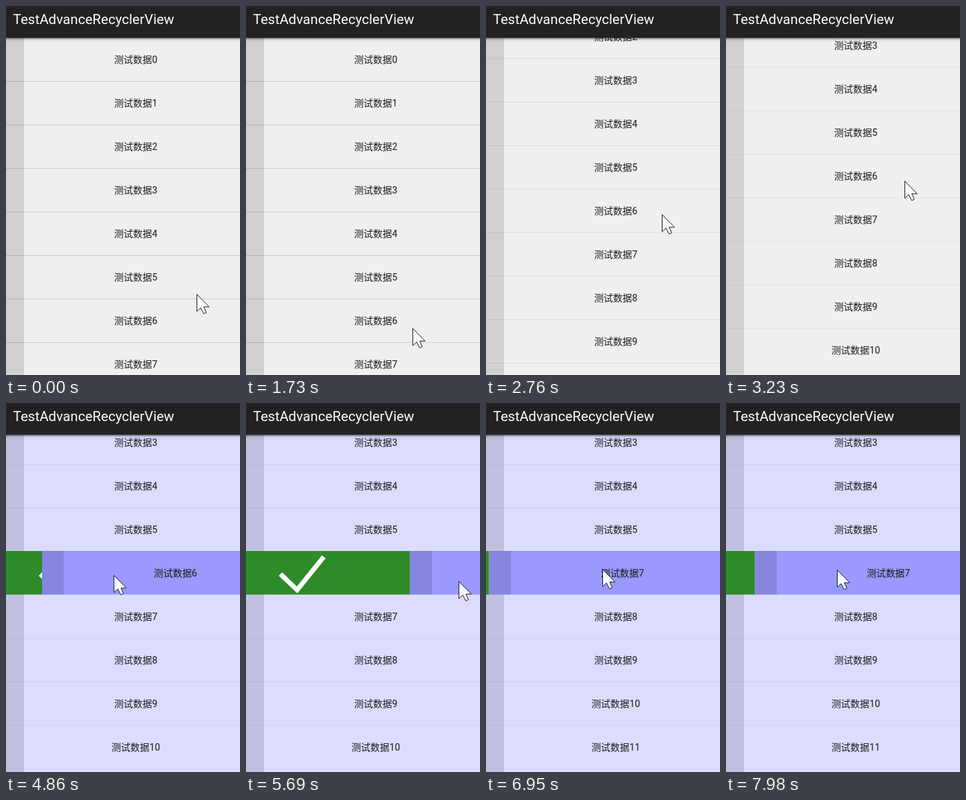
Animation, 350 px wide and 551 px high, one loop 8 s. Source, as an HTML page with a canvas:

```html
<!DOCTYPE html>
<html lang="zh-CN">
<head>
<meta charset="utf-8">
<title>TestAdvanceRecyclerView</title>
<style>
html, body { margin: 0; width: 100%; height: 100%; overflow: hidden; background: #efefef; }
canvas { display: block; }
</style>
</head>
<body>
<canvas id="stage" width="350" height="551"></canvas>
<script>
const W = 350, H = 551, ROW = 65, TOP = 47, LOOP = 8000;
const LAG = 86;                          // a swiped row trails the pointer
const RELEASE = 5740, GONE = 5900, CLOSED = 6130;
const ctx = document.getElementById('stage').getContext('2d');

// Smooth 0..1 progress between two times.
function ease(t, start, end) {
  const u = Math.min(1, Math.max(0, (t - start) / (end - start)));
  return u * u * (3 - 2 * u);
}

// Pointer gestures: each eases from wherever the last one ended.
const moves = [
  { start: 120, end: 680, x: 249, y: 484 },
  { start: 1610, end: 3280, x: 267, y: 260 },   // scroll up
  { start: 3580, end: 4050, x: 58, y: 251 },
  { start: 4470, end: 5377, x: 318, y: 266 },   // swipe row away
  { start: 6240, end: 6725, x: 132, y: 247 },
  { start: 6725, end: 7390, x: 290, y: 249 },   // swipe next row
  { start: 7390, end: 8286, x: 120, y: 249 }    // and drag it back
];

function pointer(t) {
  let x = 285, y = 430;
  for (const m of moves) {
    const p = ease(t, m.start, m.end);
    x += (m.x - x) * p;
    y += (m.y - y) * p;
  }
  return { x, y };
}

// The swiped row and how far it has been pulled.
function swipe(t) {
  const second = t > GONE;
  const pulled = pointer(t - LAG).x - (second ? 140 : 67);
  const active = pulled > 0 && (second ? t > moves[5].start : t > moves[3].start);
  if (!active) return { row: -1, shift: 0 };
  return second ? { row: 7, shift: pulled }
    : { row: 6, shift: pulled + 105 * ease(t, RELEASE, GONE) };
}

function rect(color, x, y, w, h) {
  ctx.fillStyle = color;
  ctx.fillRect(x, y, w, h);
}

function polyline(...points) {
  ctx.beginPath();
  for (const [x, y] of points) ctx.lineTo(x, y);
}

function drawGreen(y, width) {
  ctx.save();
  ctx.beginPath();
  ctx.rect(0, y, width, ROW);
  ctx.clip();
  rect('#2e8b29', 0, y, W, ROW);
  polyline([51.4, y + 34.4], [76.5, y + 58], [116.3, y + 8.8]);
  ctx.strokeStyle = '#fff';
  ctx.lineWidth = 7;
  ctx.stroke();
  ctx.restore();
}

function drawRow(index, y, shift, color) {
  const left = shift - 5.5;
  if (left > 0) drawGreen(y, left);
  rect(color, Math.max(0, left), y, W, ROW);
  rect('rgba(0,0,0,.125)', left, y, 32.5, ROW);
  ctx.fillStyle = '#1a1a1a';
  ctx.font = '14.2px Roboto, "Noto Sans CJK SC", "Noto Sans CJK", sans-serif';
  ctx.textAlign = 'center';
  ctx.fillText('测试数据' + index, 194 + shift, y + 38);
}

function drawHeader() {
  for (let k = 0; k < 8; k++) rect(`rgba(0,0,0,${.65 * .55 ** k})`, 0, TOP + k, W, 1);
  rect('#222', 0, 0, W, TOP);
  ctx.fillStyle = '#fff';
  ctx.font = '20.6px Roboto, sans-serif';
  ctx.textAlign = 'left';
  ctx.fillText('TestAdvanceRecyclerView', 10.6, 27);
}

function drawPointer({ x, y }) {
  ctx.save();
  ctx.translate(Math.round(x) + .5, Math.round(y) + .5);
  polyline([0, 0], [0, 25.5], [5.7, 20.3], [10.3, 29], [14.2, 27.2], [10.5, 18.8], [18.4, 18.8]);
  ctx.closePath();
  ctx.fillStyle = '#fafaff';
  ctx.fill();
  ctx.strokeStyle = '#15152b';
  ctx.lineWidth = 1;
  ctx.stroke();
  ctx.restore();
}

function draw(t) {
  const { row, shift } = swipe(t);
  const idle = row < 0 ? '#efefef' : '#dcdcff';
  const scrolled = ease(t, 1830, 3200);
  const offset = Math.round(216 * scrolled);
  const collapse = ease(t, GONE, CLOSED);
  const line = `rgba(0,0,0,${.15 - .1 * scrolled})`;

  rect(idle, 0, 0, W, H);
  for (let i = 0; i < 14; i++) {
    let y = TOP + ROW * i - offset;
    if (i > 6) y -= Math.round(ROW * collapse);
    if (i === 6 && t >= GONE) {
      if (collapse < 1) drawGreen(y, W);
      continue;
    }
    const swiped = i === row;
    drawRow(i, y, swiped ? shift : 0, swiped ? '#9999ff' : idle);
    rect(line, 0, y, W, 1);
  }
  drawHeader();
  drawPointer(pointer(t));
}

function frame() {
  draw(performance.now() % LOOP);
  requestAnimationFrame(frame);
}
frame();
</script>
</body>
</html>
```
